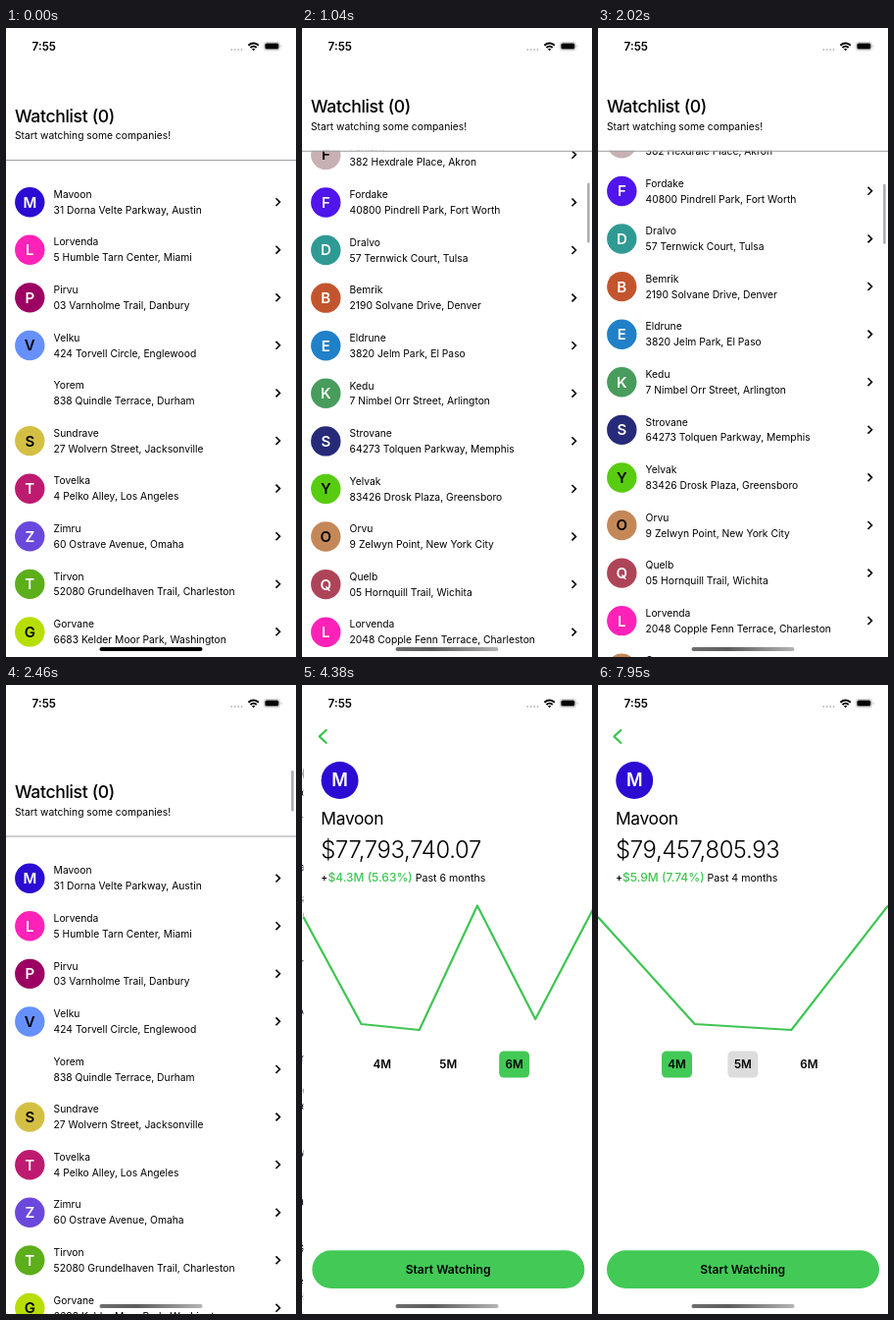
Recreate the animation shown at these times as an HTML page. Size 296 by 640 pixels, loop 8000 ms.

```html
<!DOCTYPE html>
<html lang="en">
<head>
<meta charset="utf-8">
<title>Watchlist</title>
<style>
  html, body { margin: 0; width: 100%; height: 100%; overflow: hidden; background: #fff; }
  svg { display: block; width: 296px; height: 640px; }
  text { font-family: Inter, "Open Sans", sans-serif; font-size: 10.3px; white-space: pre; }
  .title { font-size: 17.6px; font-weight: 500; letter-spacing: -.36px; }
  .name { font-size: 17.4px; letter-spacing: -.35px; }
  .price { font-size: 23.8px; font-weight: 300; letter-spacing: -.3px; }
  .change { font-size: 10.6px; }
  .gain { font-size: 12px; font-weight: 500; fill: #3fc553; }
  .bold { font-size: 11.7px; font-weight: 600; }
  .mid { text-anchor: middle; }
  .line { fill: none; stroke: #3fc553; stroke-width: 2.2; stroke-linejoin: round; }
</style>
</head>
<body>
<svg viewBox="0 0 296 640">
  <defs>
    <linearGradient id="fade"><stop stop-color="#6e6e6e"/><stop offset=".35" stop-color="#5c5c5c"/><stop offset="1" stop-color="#b4b4b4"/></linearGradient>
  </defs>

  <g id="list">
    <rect width="296" height="640" fill="#fff"/>
    <g id="rows"></g>
    <g id="head">
      <rect y="-20" width="296" height="154" fill="#fff"/>
      <text class="title" x="9" y="95.6">Watchlist (0)</text>
      <text x="9" y="113">Start watching some companies!</text>
      <rect y="134" width="296" height="1" fill="#a0a0a0"/>
    </g>
    <rect id="thumb" x="291.2" width="2.4" rx="1.2" fill="#a8a8a8"/>
  </g>

  <g id="detail">
    <rect width="296" height="640" fill="#fff"/>
    <path class="line" d="M24 45.3L16.4 52.4L24 59.5"/>
    <circle cx="37.2" cy="97" r="19" fill="#2a0cd2"/>
    <text class="mid" x="37.2" y="103.4" fill="#fff" style="font-size:18px;font-weight:600">M</text>
    <text class="name" x="18" y="142.4">Mavoon</text>
    <text class="price" id="price" x="18" y="176.3"></text>
    <text class="change" x="18" y="199.6"><tspan id="sign" font-weight="500"></tspan><tspan class="gain" id="gain"></tspan><tspan id="past"></tspan></text>
    <path class="line" id="chart"/>
    <g id="tabs"></g>
    <rect x="9" y="575.3" width="278" height="38.7" rx="19.3" fill="#42c956"/>
    <text class="bold mid" x="147.7" y="598.8" style="font-size:12.1px">Start Watching</text>
  </g>

  <g id="status">
    <text class="bold" x="26.6" y="23">7:55</text>
    <path d="M230.3 22h13" stroke="#bbb" stroke-width="1.9" stroke-linecap="round" stroke-dasharray="0 3.4"/>
    <g fill="none" stroke="#000" stroke-width="1.9">
      <path d="M247.4 17.7a7.4 7.4 0 0 1 10.4 0"/>
      <path d="M249.5 20a4.4 4.4 0 0 1 6.2 0"/>
    </g>
    <path d="M252.6 23.2l-1.6-1.8a2.3 2.3 0 0 1 3.2 0z"/>
    <rect x="263.2" y="14.4" width="16.4" height="8.4" rx="2.6" fill="none" stroke="#c0c0c0" stroke-width=".8"/>
    <rect x="264.4" y="15.6" width="14" height="6" rx="1.6"/>
    <path d="M280.8 17.2a1.6 1.6 0 0 1 0 2.8z" fill="#b0b0b0"/>
  </g>
  <rect id="home" x="95.5" y="630" width="105" height="4" rx="2"/>
</svg>

<script>
const $ = id => document.getElementById(id);
const LOOP = 8000, PITCH = 48.58, GREEN = '#42c956';

const colors = {
  Mavoon: '#2a0cd2', Lorvenda: '#ff22b8', Pirvu: '#9c0062', Velku: '#6690fc', Yorem: '#fff',
  Sundrave: '#d4bf45', Tovelka: '#bd1a70', Zimru: '#6a48dc', Tirvon: '#5cae1a', Gorvane: '#b6de00',
  Jorv: '#8468ee', Fenlark: '#c8b0b4', Fordake: '#5014ec', Dralvo: '#2f9a94', Bemrik: '#c2552e',
  Eldrune: '#2080c8', Kedu: '#489c5c', Strovane: '#262a78', Yelvak: '#58cc10', Orvu: '#c48858',
  Quelb: '#ae4458', Varnoth: '#6c58bc', Welkarne: '#9c3cb0'
};
const darkLetter = ['Velku', 'Sundrave', 'Gorvane', 'Fenlark', 'Yelvak', 'Orvu'];

const companies = `Mavoon|31 Dorna Velte Parkway, Austin
Lorvenda|5 Humble Tarn Center, Miami
Pirvu|03 Varnholme Trail, Danbury
Velku|424 Torvell Circle, Englewood
Yorem|838 Quindle Terrace, Durham
Sundrave|27 Wolvern Street, Jacksonville
Tovelka|4 Pelko Alley, Los Angeles
Zimru|60 Ostrave Avenue, Omaha
Tirvon|52080 Grundelhaven Trail, Charleston
Gorvane|6683 Kelder Moor Park, Washington
Pirvu|28347 Trosk Junction, Manassas
Jorv|7555 Umber Pass, Washington
Fenlark|382 Hexdrale Place, Akron
Fordake|40800 Pindrell Park, Fort Worth
Dralvo|57 Ternwick Court, Tulsa
Bemrik|2190 Solvane Drive, Denver
Eldrune|3820 Jelm Park, El Paso
Kedu|7 Nimbel Orr Street, Arlington
Strovane|64273 Tolquen Parkway, Memphis
Yelvak|83426 Drosk Plaza, Greensboro
Orvu|9 Zelwyn Point, New York City
Quelb|05 Hornquill Trail, Wichita
Lorvenda|2048 Copple Fenn Terrace, Charleston
Orvu|38 Quillomander Point, Louisville
Eldrune|743 Veldarno Park, Sacramento
Varnoth|3920 Brindel Crossing, Cincinnati
Welkarne|8 Ombrelin Trail, Savannah`.split('\n').map(row => row.split('|'));

$('rows').innerHTML = companies.map(([name, address], i) => `
  <g transform="translate(0 ${177.2 + i * PITCH})">
    <circle cx="24.3" r="15.2" fill="${colors[name]}"/>
    <text class="mid" x="24.3" y="5.4" fill="${darkLetter.includes(name) ? '#000' : '#fff'}"
      style="font-size:15px;font-weight:600">${name[0]}</text>
    <text x="48.6" y="-4.3">${name}</text>
    <text x="48.6" y="11.6">${address}</text>
    <path d="M275.5 -4l4 3.9l-4 3.9" fill="none" stroke="#000" stroke-width="1.6"/>
  </g>`).join('');

$('tabs').innerHTML = [4, 5, 6].map((n, i) => `
  <rect id="tab${n}" x="${65 + i * 67.4}" y="372.6" width="31" height="27" rx="4.8"/>
  <text class="bold mid" x="${80.5 + i * 67.4}" y="390.2">${n}M</text>`).join('');

const levels = [236, 345, 351, 224.5, 340, 227.5];
const summaries = {
  4: ['$79,457,805.93', '+', '$5.9M (7.74%)'],
  5: ['$22,204,316.58', '-', '$51.3M (107.23%)'],
  6: ['$77,793,740.07', '+', '$4.3M (5.63%)']
};

// The screen refreshes only at these moments.
const ticks = [0, 570, 690, 800, 920, 1030, 1140, 1260, 1370, 1480, 1590,
  1810, 1920, 2030, 2130, 2240, 2350, 2460, 2560, 2670, 2780, 2890,
  3750, 3930, 4120, 4270, 4375, 4480, 5800, 5940, 6700, 6820, 7950];

const clamp = x => Math.min(1, Math.max(0, x));
const easeOut = (x, power) => 1 - (1 - clamp(x)) ** power;

function scrollAt(t) {
  if (t < 690) return 175.6 * clamp((t - 420) / 270) ** 2;
  if (t < 1700) return 175.6 + 656 * easeOut((t - 690) / 900, 2.5);
  if (t < 2350) {
    const p = clamp((t - 1730) / 620);
    return 832 - 844 * p * p * (3 - 2 * p);
  }
  return -19.5 * (1 - clamp((t - 2460) / 430)) ** 2;
}

function showPeriod(n, pressed) {
  const [price, sign, gain] = summaries[n];
  $('price').textContent = price;
  $('sign').textContent = sign;
  $('gain').textContent = gain;
  $('past').textContent = ` Past ${n} months`;
  $('chart').setAttribute('d', 'M' + levels.slice(0, n).map((y, i) => `${296 * i / (n - 1)} ${y}`).join('L'));
  for (const k of [4, 5, 6])
    $('tab' + k).setAttribute('fill', k === n ? GREEN : k === pressed ? '#dcdcdc' : 'none');
}

function render(now) {
  const time = now % LOOP;
  const t = ticks.filter(x => x <= time).pop();
  const move = (id, x, y) => $(id).setAttribute('transform', `translate(${x} ${y})`);

  const scroll = scrollAt(t);
  move('rows', 0, -scroll);
  move('head', 0, Math.max(-9.2, -scroll));
  $('thumb').setAttribute('y', 87 + Math.max(0, scroll) * .1117);
  $('thumb').setAttribute('height', 61 + Math.min(0, scroll));
  $('thumb').setAttribute('opacity', t < 570 ? 0 : 1);
  $('rows').firstElementChild.setAttribute('opacity', t === 3750 ? .43 : 1);
  $('home').setAttribute('fill', t < 570 ? '#000' : 'url(#fade)');

  const push = easeOut((t - 3850) / 630, 3);
  move('list', -89 * push, 0);
  move('detail', 296 * (1 - push), 0);
  $('detail').setAttribute('visibility', push ? 'visible' : 'hidden');

  const period = t < 5940 ? 6 : t < 6820 ? 5 : 4;
  const pressed = t === 5800 || t === 7950 ? 5 : t === 6700 ? 4 : 0;
  showPeriod(period, pressed);
  requestAnimationFrame(render);
}
render(0);
</script>
</body>
</html>
```
